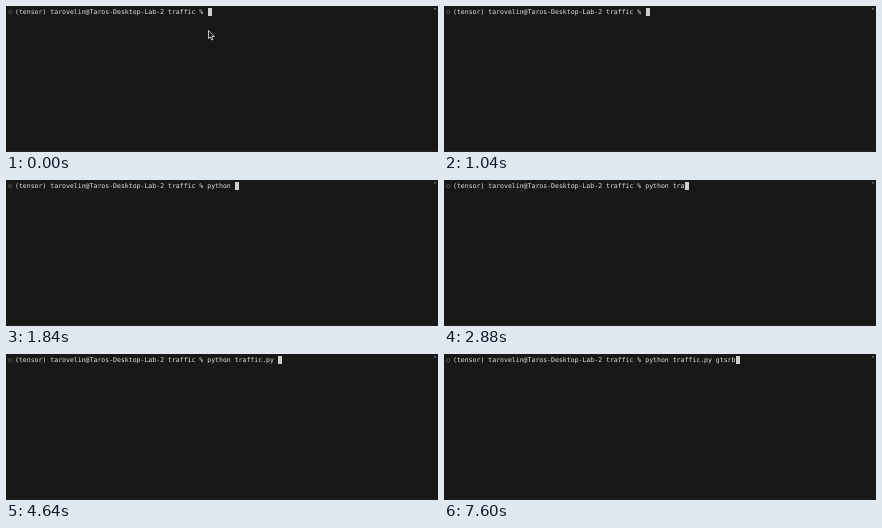
Animation, 432 px wide and 146 px high, one loop 8000 ms. Source, as an HTML page:

```html
<!DOCTYPE html>
<html lang="en">
<head>
<meta charset="utf-8">
<title>Terminal typing</title>
<style>
  html, body { margin: 0; width: 100%; height: 100%; overflow: hidden; background: #181818; }
  svg { display: block; width: 432px; height: 146px; }
  text {
    font: 6.53px "DejaVu Sans Mono", monospace;
    fill: #e2e2e2;
    white-space: pre;
    text-rendering: geometricPrecision;
  }
</style>
</head>
<body>
<svg viewBox="0 0 432 146">
  <rect width="432" height="146" fill="#181818"/>
  <rect y="145" width="432" height="1" fill="#261d1e"/>
  <circle cx="4.2" cy="6.2" r="1.7" fill="none" stroke="#626262" stroke-width=".7"/>
  <rect x="428" y="2" width="2" height="1.5" fill="#6a6a6a"/>
  <text id="line" x="9" y="8.2"></text>
  <rect id="caret" y="2" width="4" height="8" fill="#cfcfcf"/>
  <path id="pointer" d="M.5 .5V8.6L2.3 7L3.7 10L5 9.4L3.7 6.5H6.3Z"
        fill="#111" stroke="#e8e8e8" stroke-width=".8" stroke-linejoin="round"/>
</svg>
<script>
  const LOOP = 8000;
  const TICK = 80;
  const ADVANCE = 3.931;
  const PROMPT = "(tensor) tarovelin@Taros-Desktop-Lab-2 traffic % ";
  const COMMAND = "python traffic.py gtsrb";

  // Time at which each character of the command appears.
  const KEY_TIMES = [
    1120, 1200, 1360, 1520, 1600, 1760, 1840,
    2560, 2720, 2880, 3040, 3120, 3200, 3360, 3680, 3920, 4160, 4640,
    6560, 6720, 7040, 7200, 7600
  ];
  const POINTER = { from: [202, 24], to: [224, 4], steps: 7, hideAt: 1040 };

  const [line, caret, pointer] =
    ["line", "caret", "pointer"].map(id => document.getElementById(id));

  const easeInOut = p => p * p * (3 - 2 * p);

  function drawTyping(time) {
    const count = KEY_TIMES.filter(t => t <= time).length;
    const content = PROMPT + COMMAND.slice(0, count);
    if (line.textContent !== content) line.textContent = content;
    caret.setAttribute("x", Math.floor(202 + count * ADVANCE));
  }

  function drawPointer(time) {
    const step = Math.min(Math.floor(time / TICK), POINTER.steps);
    const progress = easeInOut(step / POINTER.steps);
    const [x, y] = POINTER.from.map((a, i) => a + (POINTER.to[i] - a) * progress);
    pointer.setAttribute("transform", `translate(${x} ${y})`);
    pointer.setAttribute("visibility", time < POINTER.hideAt ? "visible" : "hidden");
  }

  function render() {
    const time = performance.now() % LOOP;
    drawTyping(time);
    drawPointer(time);
    requestAnimationFrame(render);
  }
  render();
</script>
</body>
</html>
```
